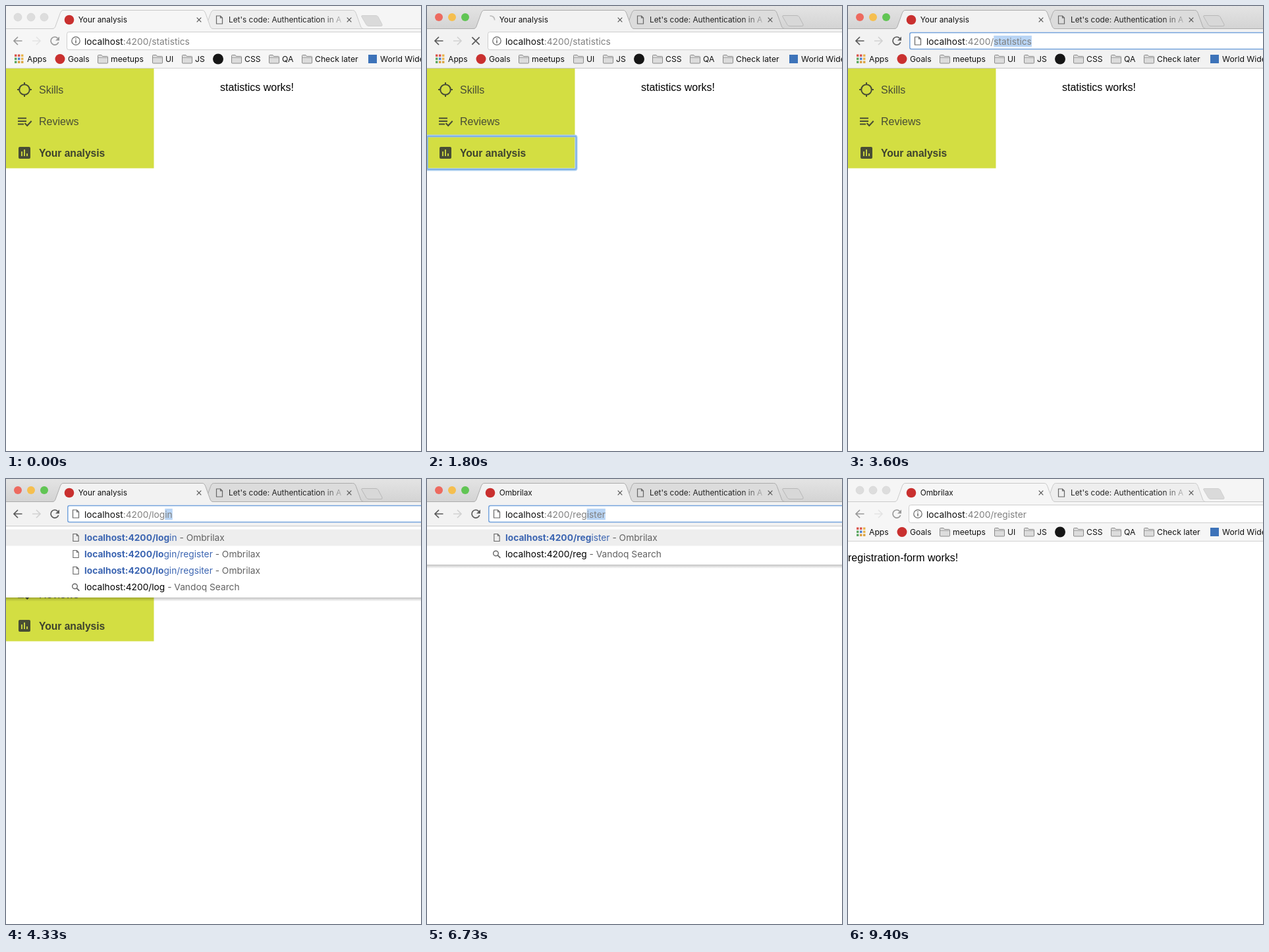
Write an HTML page that moves like this. It is 630 px wide and 676 px high and loops after 9.47 s.

```html
<!DOCTYPE html>
<html lang="en">
<head>
<meta charset="utf-8">
<title>Browser navigation</title>
<style>
html, body { margin: 0; width: 100%; height: 100%; overflow: hidden; background: #fff; }
svg { display: block; width: 630px; height: 676px; }
text { white-space: pre; }
.tab { font: 11.85px Inter, sans-serif; }
.mark { font: 12.2px Inter, sans-serif; }
.url { font: 13.76px Inter, sans-serif; }
.page { font: 16px "Liberation Sans", Arial, sans-serif; }
.line { fill: none; stroke: #666; stroke-width: 1.2; }
.b { font-weight: 700; }
</style>
</head>
<body>
<svg id="stage" viewBox="0 0 630 676"></svg>
<script>
const LOOP = 9470;
const APP = 'Ombrilax', SEARCH = 'Vandoq Search', HOST = 'localhost:4200/';
const ACTIVE = [270, 9200], RING = [670, 2400], APP_TITLE = [2400, 3130];
const LOADS = [[1670, 2400], [4700, 5270], [7270, 8070]];
const LOGIN_AT = 5270, REGISTER_AT = 8070;

// Suggestions: [matched part, rest, title]
const loginRows = typed => [
  [typed, 'login'.slice(typed.length), APP],
  ['lo', 'gin/register', APP],
  ['lo', 'gin/regsiter', APP],
  [typed, '', SEARCH]
];
const registerRows = typed => [
  [typed, 'register'.slice(typed.length), APP],
  ...(typed === 'r' ? [['r', 'egsiter', APP]] : []),
  [typed, '', SEARCH]
];

// Address bar edits: [start, typed, selected, rows]; null closes the edit
const EDITS = [[0, null]];
const typing = (focusAt, oldPath, word, times, rowsFor, enterAt) => {
  EDITS.push([focusAt, '', oldPath, []]);
  times.forEach((t, i) => {
    const typed = word.slice(0, i + 1);
    EDITS.push([t, typed, word.slice(i + 1), rowsFor(typed)]);
  });
  EDITS.push([enterAt, null]);
};
typing(3600, 'statistics', 'login', [4070, 4200, 4270, 4400, 4530], loginRows, 4700);
typing(5930, 'login', 'register', [6330, 6470, 6600, 6800, 6870, 6930, 7000, 7070], registerRows, 7270);

const text = (x, y, cls, s, fill = '#111', extra = '') =>
  `<text x="${x}" y="${y}" class="${cls}" fill="${fill}" ${extra}>${s}</text>`;
const rect = (x, y, w, h, fill, extra = '') =>
  `<rect x="${x}" y="${y}" width="${w}" height="${h}" fill="${fill}" ${extra}/>`;
const dot = (x, y, r, fill, extra = '') =>
  `<circle cx="${x}" cy="${y}" r="${r}" fill="${fill}" ${extra}/>`;
const line = (d, extra = '') => `<path class="line" d="${d}" ${extra}/>`;
const cross = (x, y, r, extra) =>
  line(`M${x - r} ${y - r}l${2 * r} ${2 * r}m0 ${-2 * r}l${-2 * r} ${2 * r}`, extra);
const sheet = (x, y, k = 1) => line('M-4.5 -6H1.5L4.5 -3V6H-4.5ZM1.5 -6V-3H4.5',
  `transform="translate(${x} ${y}) scale(${k})"`);
const folder = x => `<path d="M${x + .5} 86V75.5q0-1 1-1h4.5l1.5 2h7q1 0 1 1V86q0 1-1 1h-13q-1 0-1-1Z"
  fill="#dcdcdc" stroke="#8a8a8a"/>` + line(`M${x + 1} 78.5h14`, 'style="stroke:#a5a5a5;stroke-width:1"');
const lens = y => dot(104.5, y - 1, 3.8, 'none', 'stroke="#666" stroke-width="1.4"') +
  line(`M107.3 ${y + 1.8}l4 4`, 'style="stroke-width:1.8"');

const EDGE = 'M70 34.5C73.5 34.5 74 33 75 31L82 11.5C83.5 8 84.5 6.5 87 6.5H298' +
  'C300.5 6.5 301.5 8 303 11.5L310 31C311 33 311.5 34.5 315 34.5';

function strip(on) {
  const edge = on ? '#acacac' : '#cacaca', bar = on ? '#f2f2f2' : '#f6f6f6';
  const lights = on ? ['#ed6a5f', '#f5bf4f', '#61c554'] : ['#dddddd', '#dddddd', '#dddddd'];
  return rect(0, 0, 630, 35, on ? 'url(#bar)' : '#f5f5f5') +
    rect(0, 35, 630, 60, bar) + rect(0, 94, 630, 1, on ? '#c4c4c4' : '#d2d2d2') +
    lights.map((c, i) => dot(18 + i * 20, 17, 6, c,
      on ? '' : 'stroke="#d2d2d2" stroke-width=".6"')).join('') +
    `<path d="${EDGE}" transform="translate(228.5 0)" fill="${on ? '#dcdcdc' : '#eeeeee'}" stroke="${edge}"/>` +
    `<path d="M541 14.5h20q3 0 4 2l6 11.5q1 2.5-2 2.5h-18q-3 0-4-2l-7-12q-1-2 1-2Z"
      fill="${on ? '#d8d8d8' : '#dadada'}" stroke="${on ? '#b8b8b8' : '#d0d0d0'}"/>` +
    rect(0, 34, 630, 1, edge) +
    `<path d="${EDGE}V36H70Z" fill="${bar}"/><path d="${EDGE}" fill="none" stroke="${edge}"/>` +
    cross(293, 21, 3.3, 'style="stroke:#555"') + sheet(324, 21) +
    text(338, 25, 'tab', "Let's code: Authentication in A", 'url(#fade)') +
    cross(521, 21, 3.3, 'style="stroke:#555"');
}

function tabTitle(t, loading) {
  const named = t < APP_TITLE[0] || (t >= APP_TITLE[1] && t < LOGIN_AT);
  const icon = loading
    ? line('M95.5 15.2A6 6 0 0 1 102.7 21.5',
        `style="stroke:#bdbdbd;stroke-width:1.8" transform="rotate(${-(t - 1800) * .36} 96.5 21)"`)
    : dot(96, 21, 7.3, '#c9302f');
  return icon + text(109.7, 25, 'tab', named ? 'Your analysis' : APP);
}

function navBar(on, loading) {
  const c = on ? '#5a5a5a' : '#999';
  const pen = k => `style="stroke:${k};stroke-width:1.7"`;
  return line('M24.5 53H12M18 47l-6 6 6 6', pen(c)) +
    line('M40 53h12M46 47l6 6-6 6', pen(on ? '#d2d2d2' : '#e4e4e4')) +
    (loading ? cross(74, 53, 5.6, pen(c))
      : line('M78.5 49A6 6 0 1 0 79.7 55', pen(c)) + `<path d="M81 46.5v6h-6Z" fill="${c}"/>`);
}

function bookmarks() {
  const tints = ['#d9534a', '#d9534a', '#e9b44c', '#58a55c', '#4a80d0', '#e9b44c', '#58a55c', '#d99b3f', '#d9a441'];
  const folders = [[139, 'meetups'], [222, 'UI'], [267, 'JS'], [342, 'CSS'], [399, 'QA'], [449, 'Check later']];
  return tints.map((c, i) => rect(13 + i % 3 * 5, 73.5 + (i / 3 | 0) * 5, 3.4, 3.4, c)).join('') +
    text(32, 85, 'mark', 'Apps') + dot(82, 80.5, 7.5, '#c9302f') + text(94, 85, 'mark', 'Goals') +
    folders.map(([x, s]) => folder(x) + text(x + 20, 85, 'mark', s)).join('') +
    dot(322, 80.5, 8, '#161616') + rect(550, 74, 13, 13, '#3d73b9') + text(568, 85, 'mark', 'World Wide Web');
}

function sidebar() {
  const ink = '#484d35', pen = `style="stroke:${ink};stroke-width:2"`;
  return rect(0, 95, 224.5, 151.5, '#d3de42') +
    line('M28 116v4M28 134v4M17 127h4M35 127h4', pen) + dot(28, 127, 7.8, 'none', `stroke="${ink}" stroke-width="2"`) +
    line('M18 170.5h13M18 175h13M18 179.5h9M28.5 178l3.7 3.7 6.5-7', pen) +
    rect(19, 214, 18, 18, ink, 'rx="2"') +
    line('M24 221v7M28 218v10M32 224v4', 'style="stroke:#d3de42;stroke-width:1.8"') +
    text(50, 133, 'page', 'Skills', ink) + text(50, 181, 'page', 'Reviews', ink) +
    text(50, 229, 'page', 'Your analysis', '#3d422e', 'style="font-weight:700;font-size:15.6px"');
}

function page(t) {
  if (t >= REGISTER_AT) return text(0, 125, 'page', 'registration-form works!', '#000');
  if (t >= LOGIN_AT) return text(0, 125, 'page', 'login-form works!', '#000');
  const ring = within(t, RING)
    ? rect(-.5, 197.5, 227, 51, 'none', 'rx="2" stroke="#a9cdf0" stroke-width="4"') +
      rect(.5, 198, 226, 50, 'none', 'rx="1.5" stroke="#7fb0e6" stroke-width="1.8"') : '';
  return sidebar() + ring + text(325, 129, 'page', 'statistics works!', '#000');
}

function addressBar(edit, path) {
  const [, typed, picked] = edit;
  const open = typed !== null;
  const box = open
    ? rect(93.8, 40.5, 560, 25, '#fff', 'rx="2.5" stroke="#74a3dc" stroke-width="1.5"')
    : rect(92.5, 39.5, 560, 27, '#fff', 'rx="3" stroke="#cdcdcd"');
  const icon = open ? sheet(106, 53)
    : dot(106, 53, 6.2, 'none', 'stroke="#666" stroke-width="1.2"') +
      line('M106 52v4.5M106 49.3v1.5', 'style="stroke-width:1.5"');
  const tail = open ? typed + picked : path;
  return box + icon + '<rect id="pick" y="45" height="17" fill="#b9d5f5"/>' +
    text(119, 58.5, 'url', `<tspan fill="#111">localhost</tspan>:4200/${tail}`, '#808080', 'id="address"');
}

function suggestions(rows) {
  if (!rows || !rows.length) return '';
  const bottom = 80 + rows.length * 25, link = '#3d66b2';
  const items = rows.map(([hit, rest, title], i) => {
    const y = 89 + i * 25, search = title === SEARCH;
    const label = search ? `<tspan fill="#000">${HOST}${hit}</tspan>`
      : `<tspan class="b" fill="${link}">${HOST}${hit}</tspan><tspan fill="${link}">${rest}</tspan>`;
    return (i ? '' : rect(0, 76.5, 630, 25, '#eeeeee')) + (search ? lens(y) : sheet(106, y, .92)) +
      text(119, y + 5, 'url', `${label} - ${title}`, '#626262');
  }).join('');
  return rect(0, bottom, 630, 6, 'url(#shade)') + rect(0, 71, 630, bottom - 71, '#fff') +
    rect(0, 71, 630, 1, '#c9c9c9') + items;
}

const within = (t, [a, b]) => t >= a && t < b;
const stop = (at, color, alpha = 1) =>
  `<stop offset="${at}" stop-color="${color}" stop-opacity="${alpha}"/>`;
const DEFS = `<defs>
  <linearGradient id="bar" x2="0" y2="1">${stop(0, '#e4e4e4')}${stop(1, '#d3d3d3')}</linearGradient>
  <linearGradient id="shade" x2="0" y2="1">${stop(0, '#000', .24)}${stop(1, '#000', 0)}</linearGradient>
  <linearGradient id="fade" gradientUnits="userSpaceOnUse" x1="478" x2="514" y1="0" y2="0">
  ${stop(0, '#222')}${stop(1, '#222', .1)}</linearGradient></defs>`;

const stage = document.getElementById('stage');

function markSelection([, typed, picked]) {
  if (typed === null || !picked) return;
  const address = document.getElementById('address'), pick = document.getElementById('pick');
  const start = address.getSubStringLength(0, HOST.length + typed.length);
  pick.setAttribute('x', 119 + start);
  pick.setAttribute('width', address.getComputedTextLength() - start);
}

function draw(t) {
  const on = within(t, ACTIVE);
  const loading = LOADS.some(span => within(t, span));
  const edit = EDITS.filter(e => e[0] <= t).pop();
  const path = t >= LOADS[2][0] ? 'register' : t >= LOADS[1][0] ? 'login' : 'statistics';
  stage.innerHTML = DEFS + rect(0, 0, 630, 676, '#fff') + page(t) + strip(on) +
    tabTitle(t, loading) + navBar(on, loading) + bookmarks() +
    suggestions(edit[3]) + addressBar(edit, path);
  markSelection(edit);
}

function tick() {
  draw(performance.now() % LOOP);
  requestAnimationFrame(tick);
}
tick();
</script>
</body>
</html>
```
